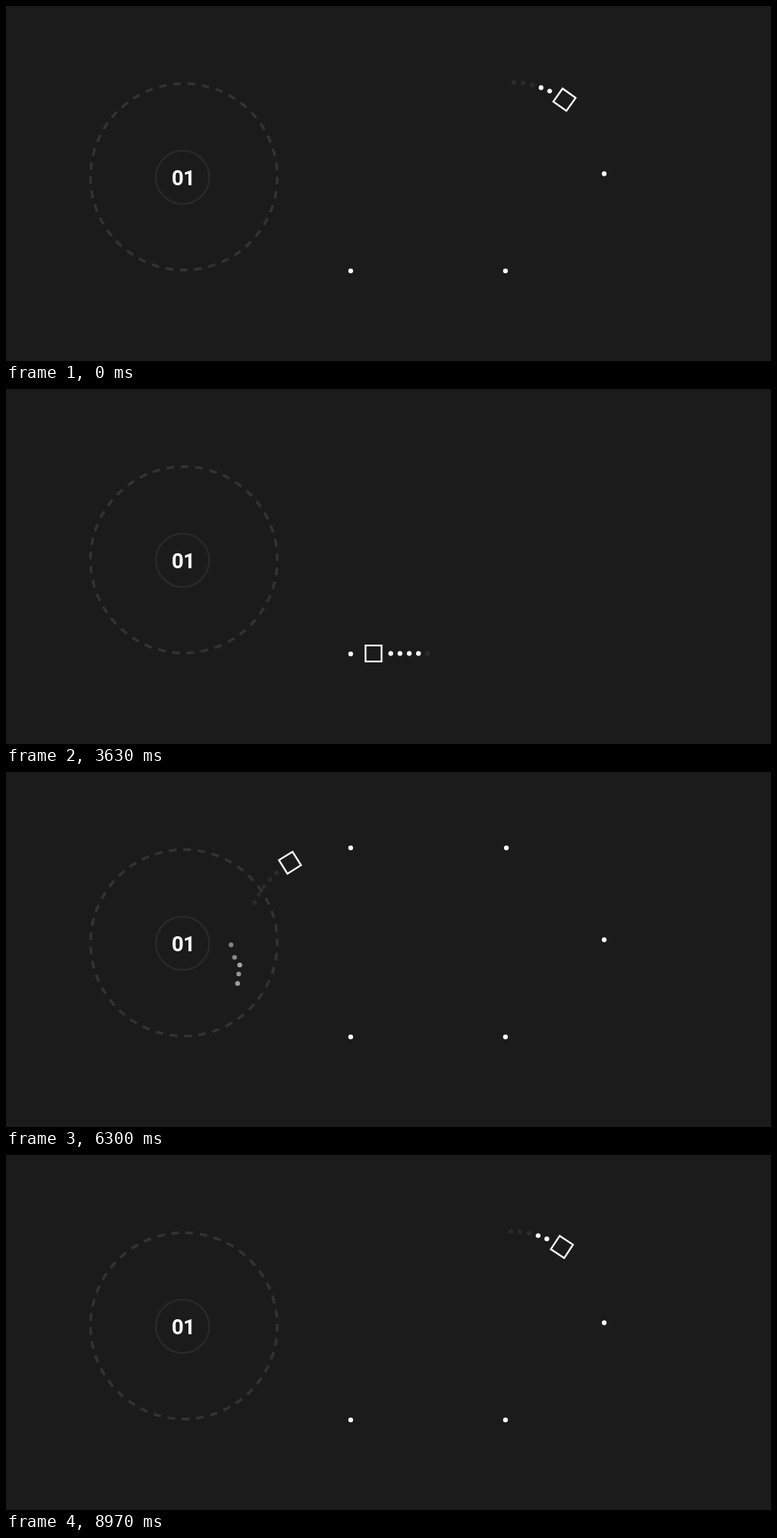
These frames come from a looping animation (860x400 px, 9 s). An HTML page:

```html
<!DOCTYPE html>
<html lang="en">
<head>
<meta charset="utf-8">
<title>Dot collector</title>
<style>
  html, body { margin: 0; width: 100%; height: 100%; overflow: hidden; background: #1b1b1b; }
  svg { display: block; }
  text { font: 700 23.5px Roboto, Inter, sans-serif; letter-spacing: -0.5px; fill: #fff; }
</style>
</head>
<body>
<svg id="stage" width="860" height="400" viewBox="0 0 860 400">
  <rect width="860" height="400" fill="#1b1b1b"/>
  <circle id="ring" cx="200" cy="192.5" r="105" fill="none" stroke="#333" stroke-width="3" pathLength="656" stroke-dasharray="8.5 7.5"/>
  <circle cx="198.5" cy="193" r="30" fill="none" stroke="#2a2a2a" stroke-width="2"/>
  <text x="186.3" y="202">01</text>
</svg>
<script>
const LOOP = 9000;
const R = 106, LEFT = 375.5, RIGHT = 566.5, MID = 192;
const LINE = RIGHT - LEFT, ARC = Math.PI * R, LAP = 2 * (LINE + ARC);
const SPEED = LAP / LOOP;
const START = 65.3;
const LAP_ORIGIN = 600;   // distances below are counted from here
const DROP = 36;          // where the trail lets its dots go
const GAP = 19.3, STEP = 10.4, REACH = 15;
const LIFE = 2250, DOT = 2.7;

// One collectable dot per trail slot; drift is its flight after release.
const dots = [
  { x: 387.5, y: 85.5,  at: 869,   drift: [-55, -90], dip: 0 },
  { x: 562.5, y: 85.5,  at: 1044,  drift: [-52, -70], dip: 0 },
  { x: 672.5, y: 189,   at: 163.5, drift: [-47, -36], dip: 0 },
  { x: 561.5, y: 298.5, at: 338,   drift: [-55, -17], dip: 70 },
  { x: 387.5, y: 298.5, at: 512,   drift: [-55, -72], dip: 0 }
];

const stage = document.getElementById("stage");
const ring = document.getElementById("ring");
const mod = (a, n) => ((a % n) + n) % n;
const clamp = v => Math.min(1, Math.max(0, v));

function add(tag, attrs) {
  const node = document.createElementNS("http://www.w3.org/2000/svg", tag);
  set(node, attrs);
  return stage.appendChild(node);
}

function set(node, attrs) {
  for (const key in attrs) node.setAttribute(key, attrs[key]);
}

// Clockwise stadium track, starting at the right end of the top line.
function track(distance) {
  let s = mod(distance, LAP);
  const arc = (cx, a) => ({ x: cx + R * Math.sin(a), y: MID - R * Math.cos(a), turn: a });
  if (s < ARC) return arc(RIGHT, s / R);
  s -= ARC;
  if (s < LINE) return { x: RIGHT - s, y: MID + R, turn: Math.PI };
  s -= LINE;
  if (s < ARC) return arc(LEFT, Math.PI + s / R);
  return { x: LEFT + s - ARC, y: MID - R, turn: 0 };
}

for (const dot of dots) dot.station = add("circle", { cx: dot.x, cy: dot.y, fill: "#fff" });
for (const dot of dots) dot.slot = add("circle", { r: DOT });
for (const dot of dots) dot.spark = add("circle", { r: DOT, fill: "#fff" });
const box = add("rect", { x: -9, y: -9, width: 18, height: 18, fill: "none", stroke: "#fff", "stroke-width": 2 });

function drawSpark(dot, age) {
  const u = clamp(age / LIFE);
  const smooth = u * u * (3 - 2 * u);
  const p = 0.75 * u + 0.25 * smooth;
  const from = track(LAP_ORIGIN + DROP);
  set(dot.spark, {
    cx: from.x + dot.drift[0] * p,
    cy: from.y + dot.drift[1] * p + dot.dip * p * (1 - p) ** 6,
    opacity: age < 0 ? 0 : 1 - u
  });
}

function render(time) {
  const phase = mod(time, LOOP) / LOOP;
  const head = START + LAP * phase - 1 + Math.cos(2 * Math.PI * phase);
  const run = mod(head - LAP_ORIGIN, LAP);
  const growth = clamp((run - 52) / 116);

  dots.forEach((dot, i) => {
    const offset = GAP + STEP * i;
    const release = DROP + offset;
    const pick = mod(dot.at - REACH - LAP_ORIGIN, LAP);
    const lit = run < release || run >= pick;
    const place = track(head - offset);
    set(dot.slot, { cx: place.x, cy: place.y, fill: lit ? "#fff" : "#2a2a2a" });
    set(dot.station, { r: run < pick ? DOT * growth : 0 });
    drawSpark(dot, (run - release) / SPEED);
  });

  const { x, y, turn } = track(head);
  set(box, { transform: `translate(${x} ${y}) rotate(${turn * 180 / Math.PI})` });
  set(ring, { transform: `rotate(${360 * phase} 200 192.5)` });
}

const begin = performance.now();
function tick() {
  render(performance.now() - begin);
  requestAnimationFrame(tick);
}
tick();
</script>
</body>
</html>
```
